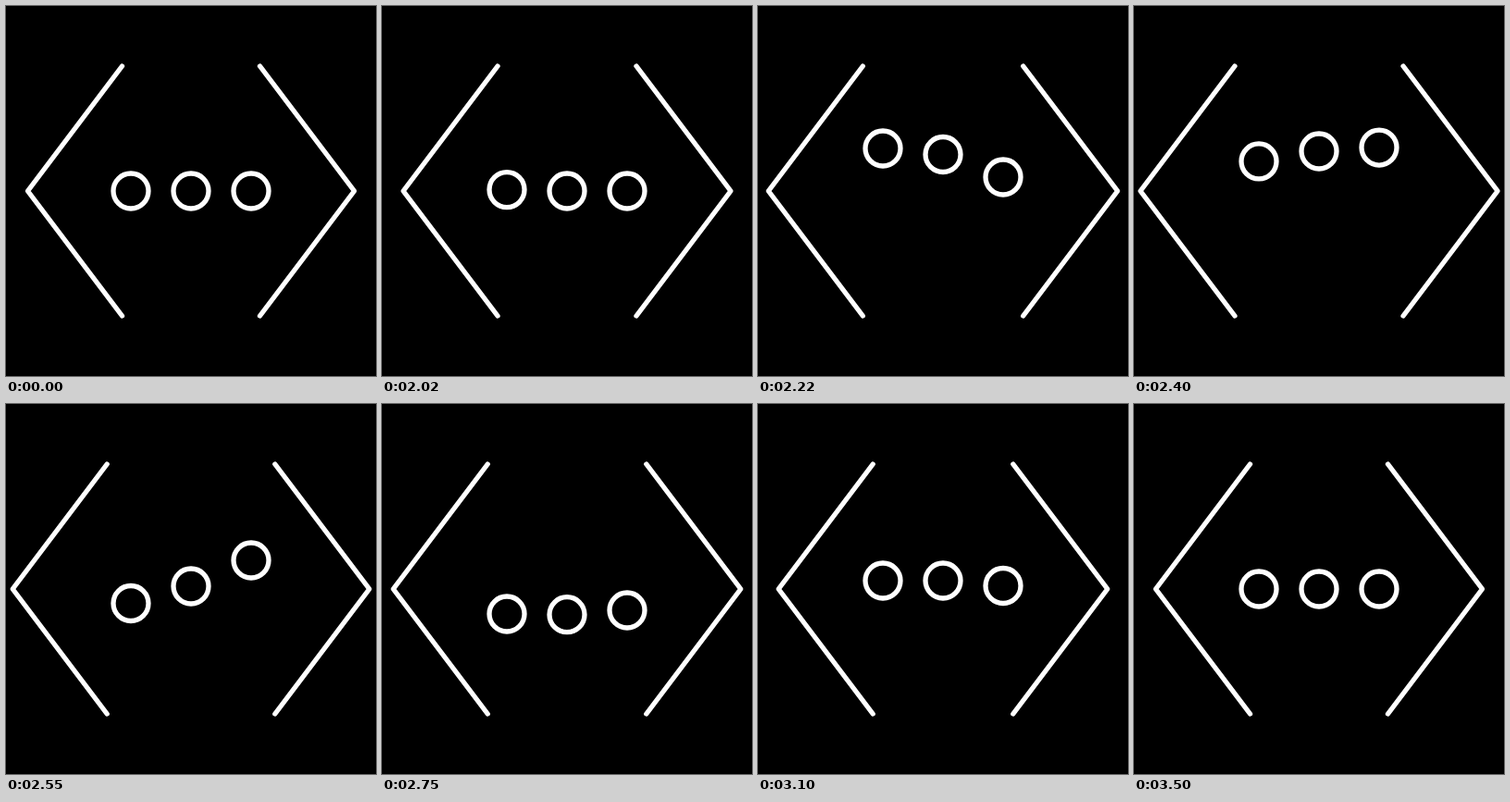
Animation, 400 px wide and 400 px high, one loop 3520 ms. Source, as an HTML page:

```html
<!DOCTYPE html>
<html lang="en">
<head>
<meta charset="utf-8">
<title>Code dots</title>
<style>
  html, body { margin: 0; width: 100%; height: 100%; overflow: hidden; background: #000; }
  svg { display: block; width: 100%; height: 100%; }
  g { fill: none; stroke: #fff; stroke-width: 5.3; stroke-linecap: round; stroke-linejoin: round; }
</style>
</head>
<body>
<svg viewBox="0 0 400 400">
  <g>
    <path id="left" d="M125.5 65L23.5 200L125.5 335"/>
    <path id="right" d="M274.5 65L376.5 200L274.5 335"/>
    <circle class="dot" cx="135" cy="200" r="19"/>
    <circle class="dot" cx="200" cy="200" r="19"/>
    <circle class="dot" cx="265" cy="200" r="19"/>
  </g>
</svg>
<script>
const LOOP = 3520, START = 2000, STAGGER = 72;

// Smooth curve through [time, value] points, flat at every peak and at both ends
function curve(points) {
  const slopes = points.slice(1).map(([t, v], i) => (v - points[i][1]) / (t - points[i][0]));
  const tangents = points.map((_, i) => {
    const a = slopes[i - 1] || 0, b = slopes[i] || 0;
    return a * b > 0 ? 2 * a * b / (a + b) : 0;
  });
  return time => {
    if (time <= points[0][0]) return points[0][1];
    const i = points.findIndex(p => p[0] > time) - 1;
    if (i < 0) return points[points.length - 1][1];
    const [t0, v0] = points[i], [t1, v1] = points[i + 1];
    const span = t1 - t0, u = (time - t0) / span, w = 1 - u;
    return v0 * w * w * (1 + 2 * u) + v1 * u * u * (3 - 2 * u)
      + span * u * w * (tangents[i] * w - tangents[i + 1] * u);
  };
}

const bounce = curve([
  [0, 0], [20, -1.4], [76, -15], [148, -39.5], [220, -46], [265, -47], [406, -31], [478, -3],
  [550, 15.5], [606, 23], [678, 27.7], [712, 28.2], [750, 27], [956, -3.5], [1028, -9],
  [1064, -9.6], [1100, -9], [1350, 0]
]);
const spread = curve([
  [0, 0], [20, 0.5], [110, 4.2], [220, 12.2], [330, 15.9], [440, 16.7], [550, 16.3],
  [750, 11.3], [925, 5.6], [1100, 1.3], [1300, 0]
]);

const left = document.getElementById("left");
const right = document.getElementById("right");
const dots = document.querySelectorAll(".dot");

function draw(now) {
  const t = now % LOOP;
  // Steps alternate between 20 and 30 ms
  const step = Math.floor(t / 50) * 50 + (t % 50 >= 20 ? 20 : 0);
  const s = step - START;
  const dx = spread(s);
  left.setAttribute("transform", `translate(${-dx})`);
  right.setAttribute("transform", `translate(${dx})`);
  dots.forEach((dot, i) => dot.setAttribute("cy", 200 + bounce(s - i * STAGGER)));
  requestAnimationFrame(() => draw(performance.now() - origin));
}

const origin = performance.now();
draw(0);
</script>
</body>
</html>
```
